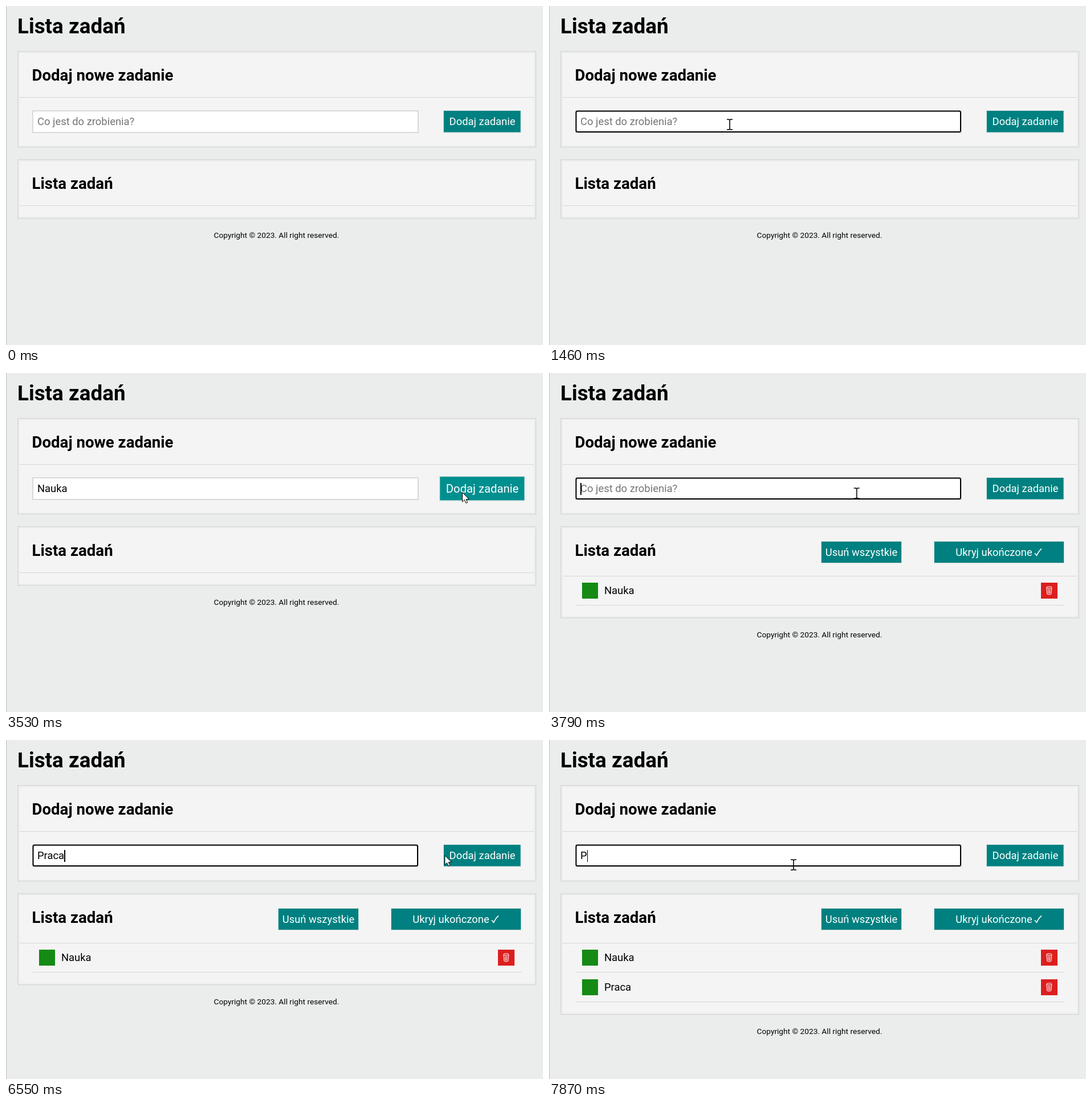
Write an HTML page that moves like this. It is 942 px wide and 595 px high and loops after 8000 ms.

```html
<!DOCTYPE html>
<html lang="pl">
<head>
<meta charset="utf-8">
<title>Lista zadań</title>
<style>
html, body { margin: 0; width: 100%; height: 100%; overflow: hidden; background: #ebeded; }
body { position: relative; }
svg { position: absolute; left: 0; top: 0; }
svg, .field { font: 18.4px Roboto, sans-serif; }
h1, h2 { margin: 0; }
.h1 { font-size: 36.8px; font-weight: 700; }
.h2 { font-size: 27.6px; font-weight: 700; }
.small { font-size: 13.7px; }
.rim { fill: #eeefef; stroke: #d7d9d8; stroke-width: 1.6; }
.face { fill: #f4f4f4; }
.line { fill: #d6d6d6; }
.btn rect { fill: #008080; stroke: #cfdedd; }
.btn text { fill: #fff; text-anchor: middle; }

.field {
  position: absolute; left: 46px; top: 183px; width: 678px; height: 40px;
  line-height: 40px; box-sizing: border-box; padding-left: 9px; white-space: pre;
}
.field::before { content: ""; animation: type 8s step-end infinite; }
.caret { display: inline-block; position: relative; width: 0; height: 0; }
.caret::after { content: ""; position: absolute; left: 0; top: -16.5px; width: 1.5px; height: 21px; background: #000; }
.hint { color: #757575; }

/* States change abruptly; only the pointer glides. */
.focus, .caret, .hint, .tasks, .second, .panel, .rule, .foot, .add, .add rect, .arrow, .beam {
  animation: 8s step-end infinite;
}
.focus { animation-name: focus; }
.caret { animation-name: blink; }
.hint { animation-name: hint; }
.tasks { animation-name: tasks; }
.second { animation-name: second; }
.panel { animation-name: grow; }
.rule { animation-name: rule; }
.foot { animation-name: foot; }
.add { transform-origin: 835px 202.5px; animation-name: hover; }
.add rect { animation-name: tint; }
.arrow { animation-name: arrow; }
.beam { animation-name: beam; }
.pointer { animation: move 8s linear infinite; }

@keyframes type {
  0%, 44.25%, 85.125% { content: ""; }
  21% { content: "N"; }
  22.625% { content: "Na"; }
  24.25% { content: "Nau"; }
  25.875% { content: "Nauk"; }
  27.625% { content: "Nauka"; }
  60.125%, 98.375%, 100% { content: "P"; }
  64.25% { content: "Pra"; }
  66.75% { content: "Prac"; }
  68.375% { content: "Praca"; }
}
@keyframes hint {
  0%, 44.25%, 85.125% { visibility: visible; }
  21%, 60.125%, 98.375%, 100% { visibility: hidden; }
}
@keyframes focus {
  0%, 42.5%, 83.5% { visibility: hidden; }
  11.875%, 44.25%, 85.125%, 100% { visibility: visible; }
}
@keyframes blink {
  0%, 18.25%, 34.25%, 42.5%, 58.5%, 75%, 83.5%, 91.625% { visibility: hidden; }
  11.875%, 21%, 40.875%, 44.25%, 60.125%, 81.625%, 85.125%, 98.375%, 100% { visibility: visible; }
}
@keyframes tasks { 0% { visibility: hidden; } 44.25%, 100% { visibility: visible; } }
@keyframes second { 0% { visibility: hidden; } 85.125%, 100% { visibility: visible; } }
@keyframes grow {
  0% { transform: translateY(0); }
  44.25% { transform: translateY(57px); }
  85.125%, 100% { transform: translateY(109px); }
}
@keyframes rule { 0% { transform: none; } 44.25%, 100% { transform: translateY(6px); } }
@keyframes foot {
  0% { transform: translateY(0); }
  44.25% { transform: translateY(57px); }
  85.125%, 100% { transform: translateY(109px); }
}
@keyframes hover {
  0%, 47%, 87.125%, 100% { transform: scale(1); }
  41.25%, 82.625% { transform: scale(1.1); }
}
@keyframes tint {
  0%, 47%, 87.125%, 100% { fill: #008080; }
  41.25%, 82.625% { fill: #008f8f; }
}
@keyframes arrow {
  0%, 8.6%, 47%, 49.1%, 87.875%, 100% { visibility: hidden; }
  .875%, 40.375%, 48.5%, 80.75% { visibility: visible; }
}
@keyframes beam {
  0%, 40.375%, 48.5%, 80.75% { visibility: hidden; }
  8.6%, 47%, 49.1%, 87.875%, 100% { visibility: visible; }
}
@keyframes move {
  0%, .875% { transform: translate(764px, 530px); }
  4% { transform: translate(560px, 420px); }
  6.5% { transform: translate(375px, 335px); }
  7.125% { transform: translate(348px, 315px); }
  8% { transform: translate(325px, 240px); }
  9.125%, 36.75% { transform: translate(317px, 208px); }
  39% { transform: translate(560px, 212px); }
  40.5% { transform: translate(740px, 212px); }
  41.5% { transform: translate(800px, 208px); }
  46.25% { transform: translate(800px, 210px); }
  46.6% { transform: translate(775px, 210px); }
  47.375% { transform: translate(541px, 211px); }
  48.25% { transform: translate(450px, 218px); }
  48.75% { transform: translate(420px, 224px); }
  49.5% { transform: translate(385px, 215px); }
  51% { transform: translate(338px, 200px); }
  52.75%, 74.25% { transform: translate(348px, 196px); }
  77.5% { transform: translate(500px, 186px); }
  80% { transform: translate(690px, 192px); }
  81.875% { transform: translate(769px, 202px); }
  83.5%, 86.5% { transform: translate(800px, 208px); }
  88.5% { transform: translate(690px, 212px); }
  91.625%, 100% { transform: translate(429px, 219px); }
}
</style>
</head>
<body>
<svg width="942" height="595" viewBox="0 0 942 595">
  <defs>
    <g id="task">
      <rect x="58" y="368" width="28" height="28" fill="#158a15"/>
      <rect x="863" y="368" width="29" height="28" fill="#dd1e1e"/>
      <g fill="none" stroke="#fff">
        <ellipse cx="877.3" cy="376.3" rx="4.6" ry="1.5"/>
        <path d="M872.7 376.5L873.8 388Q877.3 390 880.8 388L881.9 376.5"/>
        <path d="M875.3 379L875.8 387M877.3 379V387.5M879.3 379L878.8 387" stroke-width=".8"/>
      </g>
      <rect class="line" x="47" y="407" width="857" height="1"/>
    </g>
    <clipPath id="below"><rect x="0" y="320" width="942" height="275"/></clipPath>
  </defs>

  <rect width="1" height="595" fill="#bcbebd"/>
  <text class="h1" x="20" y="48">Lista zadań</text>

  <rect class="rim" x="20.8" y="79.8" width="908.6" height="167.8"/>
  <rect class="face" x="24" y="83" width="902" height="161.5"/>
  <text class="h2" x="45.5" y="131">Dodaj nowe zadanie</text>
  <rect class="line" x="24" y="160" width="902" height="1"/>
  <rect x="47" y="184" width="676" height="38" fill="#fff" stroke="#d9d9d9" stroke-width="2"/>
  <rect class="focus" x="47.5" y="184.5" width="674.5" height="36.5" rx="2.5" fill="#fff" stroke="#000" stroke-width="2"/>
  <g class="btn add">
    <rect x="767.5" y="183.5" width="135.5" height="38.5"/>
    <text x="835.5" y="209">Dodaj zadanie</text>
  </g>

  <!-- The lower panel: a fixed top and a sliding bottom edge -->
  <g clip-path="url(#below)">
    <g class="panel">
      <rect class="rim" x="20.8" y="69.8" width="908.6" height="302.8"/>
      <rect class="face" x="24" y="73" width="902" height="296.5"/>
    </g>
  </g>
  <path d="M20.8 321V269.8H929.4V321" class="rim"/>
  <rect class="face" x="24" y="273" width="902" height="49"/>
  <text class="h2" x="45.5" y="321">Lista zadań</text>
  <rect class="line rule" x="24" y="350" width="902" height="1"/>

  <g class="tasks">
    <g class="btn">
      <rect x="477.5" y="295.5" width="141" height="38"/>
      <text x="548" y="321">Usuń wszystkie</text>
      <rect x="675.5" y="295.5" width="228" height="38"/>
      <text x="780.5" y="321">Ukryj ukończone</text>
      <path d="M852 316.2L855.6 320.3Q858.5 313 864 308.3" fill="none" stroke="#fff" stroke-width="1.6"/>
    </g>
    <use href="#task"/>
    <text x="97" y="388">Nauka</text>
  </g>
  <g class="second">
    <use href="#task" y="52"/>
    <text x="97" y="440">Praca</text>
  </g>
  <text class="small foot" x="474.5" y="407" text-anchor="middle">Copyright © 2023. All right reserved.</text>
</svg>

<div class="field"><i class="caret"></i><span class="hint">Co jest do zrobienia?</span></div>

<svg width="942" height="595" viewBox="0 0 942 595">
  <g class="pointer">
    <path class="arrow" d="M.5 .5V17L4.3 13.4L6.9 19.3L9.6 18.1L7 12.4H12.2Z" fill="#fff" stroke="#000"/>
    <path class="beam" d="M-5 -9H-1.5L0 -8L1.5 -9H5M0 -8V8M-5 9H-1.5L0 8L1.5 9H5" fill="none" stroke="#000" stroke-width="1.6"/>
  </g>
</svg>
</body>
</html>
```
